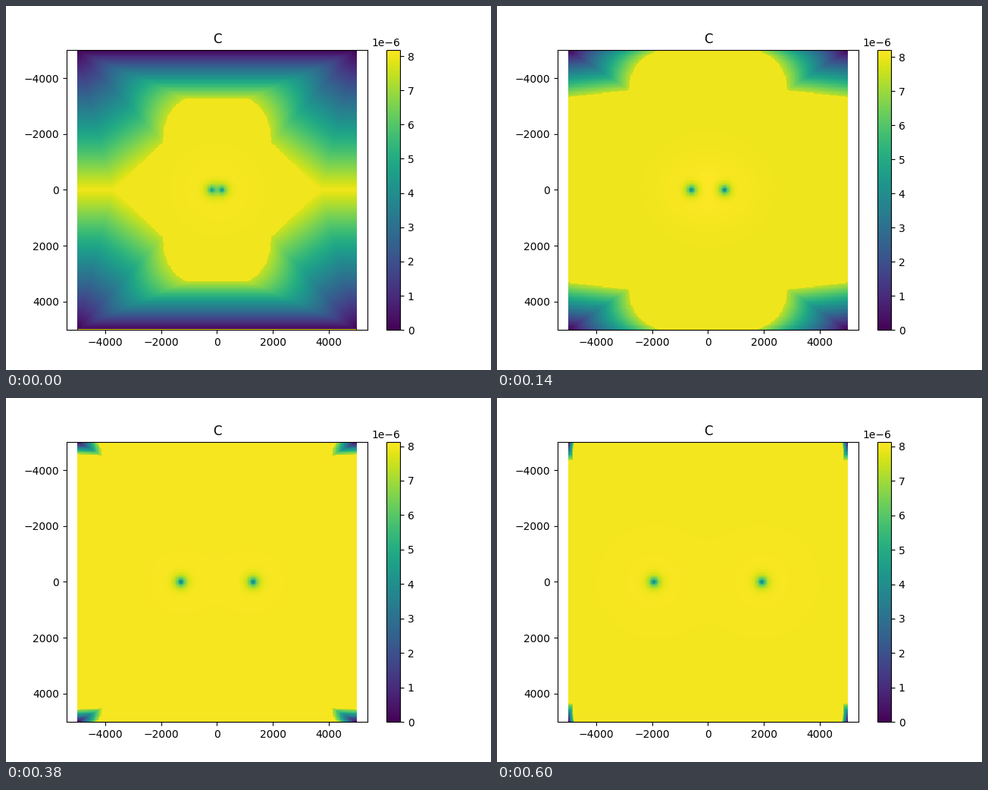
Recreate the animation shown at these times as a matplotlib script. Size 640 px wide and 480 px high, loop 620 ms.

```python
import numpy as np
import matplotlib.pyplot as plt
from matplotlib.animation import FuncAnimation

FRAMES = 31
HALF = 5000
CELLS = 300

# Depleted corner at a few steps, as distances from the corner / 1000:
# step, reach down the side, knee x, knee y, reach along the top, colour maximum
KEYS = np.array([
    (0, 5.00, 3.06, 3.30, 3.87, 8.187),
    (2, 3.84, 2.00, 1.95, 3.06, 8.187),
    (7, 1.68, 2.16, 1.43, 3.22, 8.220),
    (11, 1.81, 0.97, 1.38, 1.11, 8.190),
    (15, 0.43, 1.70, 0.55, 1.30, 8.130),
    (23, 0.43, 0.05, 0.40, 0.045, 8.130),
    (30, 0.65, 0.15, 0.65, 0.22, 8.140),
])

axis = np.linspace(-HALF, HALF, CELLS)
X, Y = np.meshgrid(axis, axis)
U = (HALF - abs(X)) / 1000
W = (HALF - abs(Y)) / 1000


def params(step):
    return [np.interp(step, KEYS[:, 0], col) for col in KEYS.T[1:]]


def outline(step):
    """Side shelf, knee, then a curve up to the top edge."""
    side, kx, ky, top, _ = params(step)
    gap = max(0, 1 - step / 2)
    depth = 1.73 * gap
    knee, end = np.array([kx, ky]), np.array([top, depth])
    bend = np.array([kx, depth + (ky - depth) / 4])
    curve = [(1 - t) ** 2 * knee + 2 * t * (1 - t) * bend + t * t * end
             for t in np.linspace(0, 1, 5)]
    return [(0, side), (1.27 * gap, side), *curve, (1e4, depth)]


def corner_ramp(step):
    """Linear rise from 0 at the corners to the outline (triangle fan)."""
    ramp = np.ones_like(U)
    pts = outline(step)
    for (au, aw), (bu, bw) in zip(pts[:-1], pts[1:]):
        det = au * bw - aw * bu
        if abs(det) < 1e-9:
            continue
        a = (U * bw - W * bu) / det
        b = (au * W - aw * U) / det
        inside = (a >= -1e-9) & (b >= -1e-9) & (a + b < 1)
        # the outermost shell is slightly weaker away from the midline
        va, vb = (1 - 0.07 * min(1, HALF / 1000 - w) for w in (aw, bw))
        ramp = np.where(inside, np.minimum(ramp, a * va + b * vb), ramp)
    return ramp


def concentration(step, vmax):
    """Bulk level with two sinks drifting apart, each with a faint halo."""
    pos = 185 + 58.3 * step
    dip = 5.4 - 1.2 * np.exp(-step / 3)
    halo = 0.06 * ((vmax - 8) / 0.187) ** 1.5 * (1 - 0.45 * np.exp(-step / 4))
    c = 8.005 * corner_ramp(step)
    for x0 in (-pos, pos):
        r = np.hypot(X - x0, Y)
        c += halo * np.exp((1000 - r) / 625) - dip * np.exp(-r / 125)
    return np.clip(c, 0, vmax) * 1e-6


fig, ax = plt.subplots(figsize=(6.4, 4.8), dpi=100)
mesh = ax.pcolormesh(X, Y, np.zeros_like(X), shading="nearest",
                     cmap="viridis", vmin=0, vmax=8e-6)
ax.axis("equal")
ax.invert_yaxis()
ax.set_title("C")
fig.colorbar(mesh, ax=ax)


def update(step):
    vmax = params(step)[-1]
    mesh.set_array(concentration(step, vmax))
    mesh.set_clim(0, vmax * 1e-6)
    return [mesh]


anim = FuncAnimation(fig, update, frames=FRAMES, interval=20,
                     repeat=True, repeat_delay=0, blit=False)
plt.show()
```
